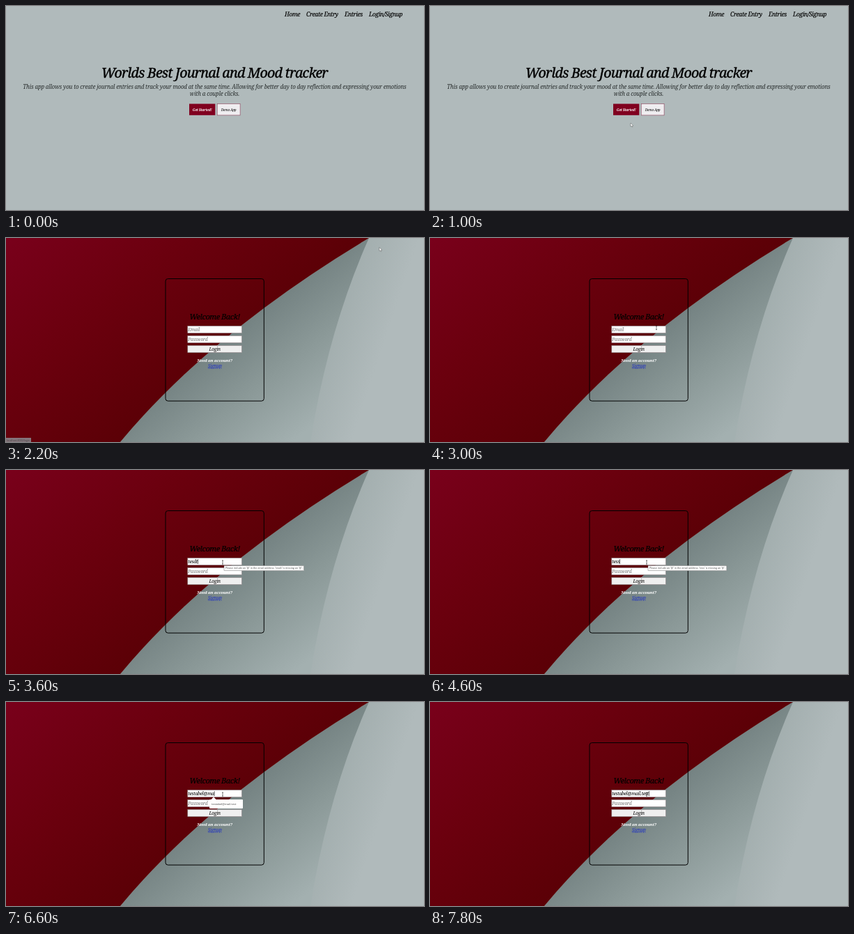
An HTML page for the animation above (8 s loop, 600 by 293 pixels).

```html
<!DOCTYPE html>
<html lang="en">
<head>
<meta charset="utf-8">
<title>Journal login</title>
<style>
html, body { margin: 0; width: 100%; height: 100%; overflow: hidden; background: #b0babb; }
svg { display: block; width: 600px; height: 293px; }
text { font-family: "Noto Serif", serif; font-style: italic; letter-spacing: -.04em; white-space: pre; }
.mid { text-anchor: middle; }
.nav { font-size: 8.5px; stroke: #000; stroke-width: .15px; }
.title { font-size: 19.7px; stroke: #000; stroke-width: .35px; }
.lead { font-size: 8px; letter-spacing: -.02em; fill: #262b2b; }
.btn { font-size: 4.8px; }
.head { font-size: 11px; stroke: #000; stroke-width: .2px; }
.field { font-size: 6.7px; }
.ask { font-size: 6px; }
.hint { fill: #757575; }
.bold { font-weight: 700; fill: #fff; }
.ui { font-family: "Open Sans", sans-serif; font-style: normal; letter-spacing: 0; fill: #444; }
</style>
</head>
<body>
<svg viewBox="0 0 600 293">
  <defs>
    <linearGradient id="red" gradientUnits="userSpaceOnUse" x1="0" y1="0" x2="210" y2="255">
      <stop offset="0" stop-color="#79001b"/>
      <stop offset=".5" stop-color="#6b000e"/>
      <stop offset="1" stop-color="#5b0006"/>
    </linearGradient>
    <linearGradient id="gray" gradientUnits="userSpaceOnUse" x1="300" y1="145" x2="415" y2="290">
      <stop offset="0" stop-color="#728080"/>
      <stop offset=".5" stop-color="#8b9998"/>
      <stop offset="1" stop-color="#a3b0b0"/>
    </linearGradient>
    <linearGradient id="pale" gradientUnits="userSpaceOnUse" x1="450" y1="130" x2="540" y2="160">
      <stop offset="0" stop-color="#9fabab"/>
      <stop offset="1" stop-color="#b0babb"/>
    </linearGradient>
  </defs>

  <g id="home">
    <rect width="600" height="293" fill="#b0babb"/>
    <g class="nav">
      <text x="400" y="15.3">Home</text>
      <text x="431" y="15.3">Create Entry</text>
      <text x="486" y="15.3">Entries</text>
      <text x="521" y="15.3">Login/Signup</text>
    </g>
    <g class="mid">
      <text class="title" x="299.3" y="102.8">Worlds Best Journal and Mood tracker</text>
      <text class="lead" x="299.5" y="118.5">This app allows you to create journal entries and track your mood at the same time. Allowing for better day to day reflection and expressing your emotions</text>
      <text class="lead" x="299.5" y="128.5">with a couple clicks.</text>
      <rect x="263" y="140.5" width="37.3" height="16.3" fill="#80001f"/>
      <text class="btn bold" x="281.6" y="150.6">Get Started!</text>
      <rect x="303.2" y="140.5" width="32.9" height="16.4" fill="#efedf0" stroke="#8c4058" stroke-width=".6"/>
      <text class="btn" x="319.6" y="150.6">Demo App</text>
    </g>
  </g>

  <g id="login">
    <rect width="600" height="293" fill="url(#pale)"/>
    <path d="M521 0Q463 130 437 293H164Q295 135.5 521 0" fill="url(#gray)"/>
    <path d="M0 0H521Q295 135.5 164 293H0Z" fill="url(#red)"/>
    <rect x="229" y="58.5" width="141.3" height="175.6" rx="3.5" fill="none" stroke="#000"/>
    <g class="mid">
      <text class="head" x="299.5" y="117">Welcome Back!</text>
      <text class="ask bold" x="299.5" y="177.6">Need an account?</text>
      <text class="field" x="299.7" y="185.6" fill="#1d2fc4" text-decoration="underline">Signup</text>
    </g>
    <g fill="#fff" stroke="#8a8084" stroke-width=".6">
      <rect x="260.8" y="126.3" width="77.7" height="10.2"/>
      <rect x="260.8" y="140.3" width="77.7" height="10.2"/>
      <rect x="260.8" y="154.4" width="77.7" height="10.2" fill="#efefef"/>
    </g>
    <text class="field hint" id="hint" x="261.2" y="133.7">Email</text>
    <text class="field" id="email" x="261.2" y="133.7"></text>
    <rect id="caret" y="128" width=".6" height="7"/>
    <text class="field hint" x="261.2" y="147.7">Password</text>
    <text class="field mid" x="299.6" y="161.8">Login</text>
    <g id="tip">
      <rect id="tipBox" x="313" y="137.3" height="7.4" fill="#fff" stroke="#777" stroke-width=".5"/>
      <text class="ui" id="tipText" x="315" y="142.3" font-size="3.6"></text>
    </g>
    <g id="popup">
      <path d="M293 140H294.5L298 136.3L301.5 140H339Q340 140 340 141V152Q340 153 339 153H293Q292 153 292 152V141Q292 140 293 140Z" fill="#fff"/>
      <text class="ui" x="295" y="148" font-size="4.1">testabel@mail.test</text>
    </g>
    <g id="status">
      <rect y="287" width="36" height="6" fill="#85757c"/>
      <text class="ui" x="1" y="291.5" font-size="3.5">localhost:3000/login</text>
    </g>
  </g>

  <g id="pointer">
    <path id="arrow" d="M0 0V5.2L1.2 4.2L2 6L2.9 5.6L2.1 3.9H3.7Z" fill="#fff" stroke="#333" stroke-width=".35"/>
    <path id="hand" d="M-.6 0Q0-.7 .6 0V2.1L2.3 2.6Q2.8 3 2.6 4L2 5.8H-.8L-2.2 3.6Q-2 2.9-.6 3.4Z" fill="#fff" stroke="#444" stroke-width=".3"/>
    <path id="beam" d="M-1-2.6H1M0-2.6V2.6M-1 2.6H1" fill="none" stroke="#222" stroke-width=".6"/>
  </g>
</svg>
<script>
const LOOP = 8000;
const $ = id => document.getElementById(id);
const show = (id, on) => { $(id).style.display = on ? '' : 'none'; };

// [time, x, y, shape]
const moves = [
  [0, 0, 0, ''],
  [400, 76, 202, 'arrow'], [600, 308, 173, 'arrow'],
  [1000, 288, 168, 'arrow'], [1200, 335, 132, 'arrow'], [1400, 400, 88, 'arrow'],
  [1600, 468, 46, 'arrow'], [1800, 520, 20, 'arrow'], [2000, 541.5, 12.5, 'hand'],
  [2200, 536, 13.5, 'arrow'], [2400, 500, 35, 'arrow'], [2600, 435, 75, 'arrow'],
  [2800, 365, 112, 'arrow'], [3000, 325, 129, 'beam'], [3200, 311, 132.5, 'beam']
];

const typed = [
  [0, ''], [3400, 'te'], [3600, 'tesdt'], [4000, 'tesd'], [4200, 'tes'],
  [4600, 'tess'], [4800, 'tes'], [5000, 'test'], [5400, 'testabe'], [5600, 'testabel'],
  [6000, 'testabel@'], [6400, 'testabel@m'], [6600, 'testabel@ma'], [6800, 'testabel@mai'],
  [7200, 'testabel@mail'], [7400, 'testabel@mail.t'], [7600, 'testabel@mail.tes'],
  [7800, 'testabel@mail.test']
];

const at = (steps, t) => steps.findLast(s => s[0] <= t);

function draw(t) {
  const [, x, y, shape] = at(moves, t);
  $('pointer').setAttribute('transform', `translate(${x} ${y})`);
  for (const id of ['arrow', 'hand', 'beam']) show(id, id === shape);

  show('home', t < 2200);
  show('login', t >= 2200);
  if (t < 2200) return;

  const value = at(typed, t)[1];
  const email = $('email');
  email.textContent = value;
  show('hint', !value);
  show('caret', t >= 3200);
  $('caret').setAttribute('x', 261.4 + (value ? email.getComputedTextLength() : 0));

  const tip = t >= 3600 && t < 5400;
  show('tip', tip);
  if (tip) {
    const label = $('tipText');
    label.textContent = `Please include an '@' in the email address. '${value}' is missing an '@'.`;
    $('tipBox').setAttribute('width', label.getComputedTextLength() + 4);
  }
  show('popup', t >= 5400 && t < 7800);
  show('status', t < 2600);
}

const start = performance.now();
function tick() {
  draw((performance.now() - start) % LOOP);
  requestAnimationFrame(tick);
}
tick();
</script>
</body>
</html>
```
